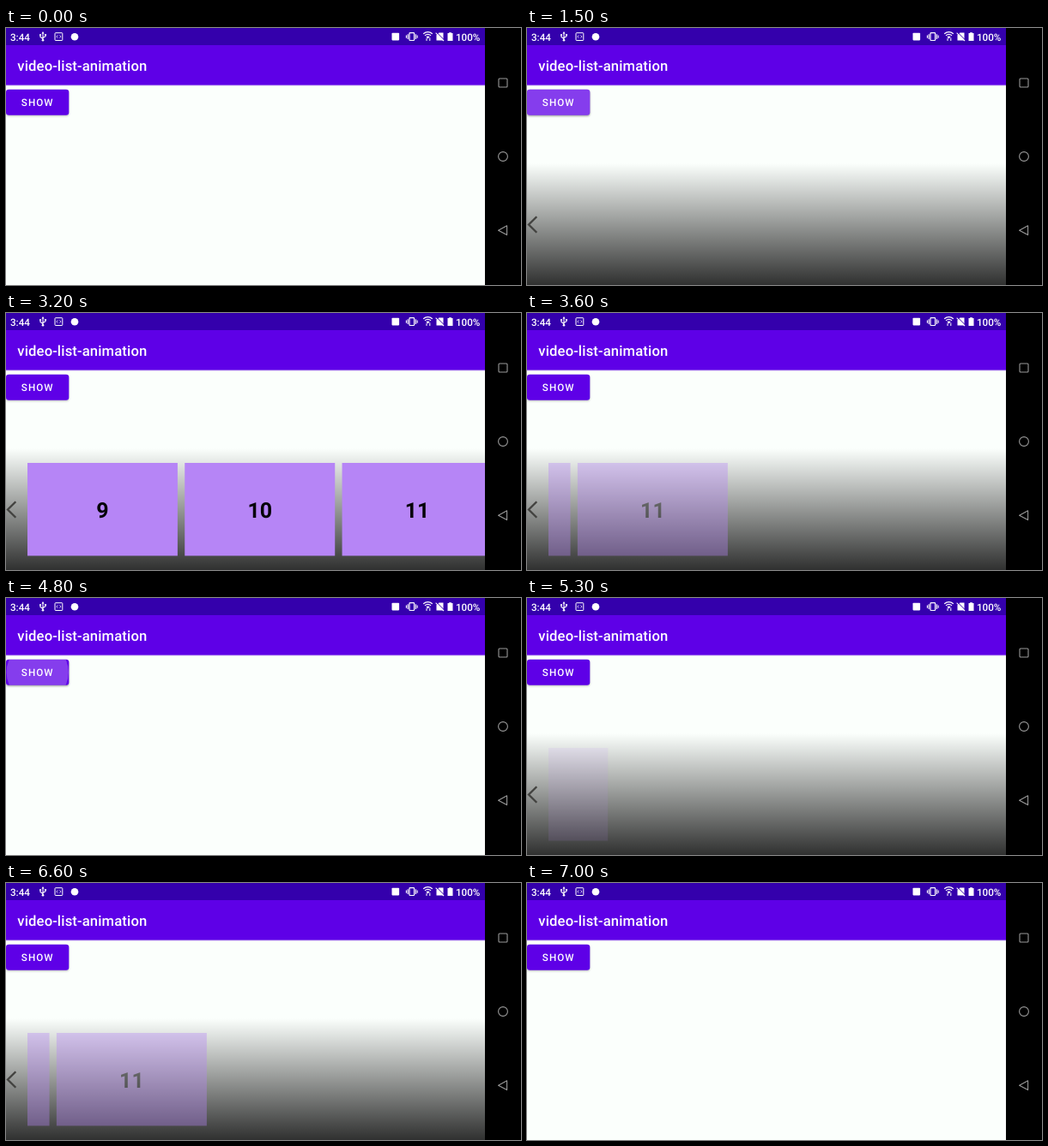
These frames come from a looping animation (600x300 px, 7100 ms). An HTML page:

```html
<!DOCTYPE html>
<html lang="en">
<head>
<meta charset="utf-8">
<title>List animation</title>
<style>
  html, body { margin: 0; width: 100%; height: 100%; overflow: hidden; background: #000; }
  svg { display: block; }
  text { font-family: Roboto, sans-serif; font-weight: 500; font-size: 11.67px; fill: #fff; text-rendering: geometricPrecision; }
  .title { font-size: 16.67px; letter-spacing: .0075em; }
  .label { letter-spacing: .0893em; }
  .number { font-size: 25px; font-weight: 700; fill: #050308; text-anchor: middle; }
  .line { fill: none; stroke: #fff; }
  .nav { fill: none; stroke: #999; stroke-width: 1.1; stroke-linejoin: round; }
</style>
</head>
<body>
<svg width="600" height="300" viewBox="0 0 600 300">
  <defs>
    <linearGradient id="shade" x1="0" y1="0" x2="0" y2="1">
      <stop offset="0" stop-opacity="0"/>
      <stop offset="1" stop-opacity=".81"/>
    </linearGradient>
    <clipPath id="listClip"><rect x="25" y="158" width="533" height="142"/></clipPath>
    <clipPath id="buttonClip"><rect y="71.7" width="73.3" height="30" rx="3.3"/></clipPath>
    <filter id="blur" x="-20%" y="-30%" width="140%" height="170%"><feGaussianBlur stdDeviation="1.3"/></filter>
  </defs>

  <rect width="558" height="300" fill="#fbfffc"/>
  <rect y="66" width="558" height="1.6" fill="#d9c9f4"/>
  <rect y="19" width="558" height="47.6" fill="#5e00e7"/>
  <rect width="558" height="20" fill="#3400ac"/>

  <!-- status bar -->
  <text x="5" y="14.6">3:44</text>
  <text x="524" y="14.6">100%</text>
  <g class="line">
    <path d="M43 6V14M40 8.5V10.5L43 12.5M46 8V9.8L43 11.5" stroke-width="1.1"/>
    <rect x="57" y="5.7" width="8.8" height="8.8" rx=".8"/>
    <path d="M60.3 8.5L58.8 10.1L60.3 11.7M62.5 8.5L64 10.1L62.5 11.7" stroke-width=".8"/>
    <rect x="470" y="5.7" width="5.6" height="8.8" rx=".8" stroke-width="1.2"/>
    <path d="M468.2 7.3V13M466.4 8.5V11.7M477.4 7.3V13M479.2 8.5V11.7" stroke-width="1.1"/>
    <path d="M486.2 6.8Q491.5 2.6 496.8 6.8M488 8.8Q491.5 6 495 8.8" stroke-width="1.3"/>
    <path d="M490 12V15M493.8 11.5V15" stroke-width="1"/>
  </g>
  <g fill="#fff">
    <path d="M43 4L44.5 6.4H41.5Z"/>
    <circle cx="43" cy="14.3" r="1.3"/>
    <circle cx="40" cy="8.2" r="1.1"/>
    <rect x="45" y="7" width="2" height="2"/>
    <circle cx="80" cy="10.2" r="4.3"/>
    <rect x="449.5" y="5.8" width="8.6" height="8.6" rx=".8"/>
    <path d="M489.4 10.2Q491.5 8.6 493.6 10.2L491.5 12.4Z"/>
    <path d="M504.5 5.5H509.5V14.5H501.5V8.2Z"/>
    <path d="M516 5.2H519V6.1H520.5V14.9H514.5V6.1H516Z"/>
  </g>
  <path class="line" d="M500.7 5.6L510 15" stroke-width="1.2"/>
  <path d="M501.7 5.1L510.6 14" stroke="#3400ac" stroke-width="1"/>

  <text class="title" x="13.3" y="49.8">video-list-animation</text>

  <!-- button -->
  <rect id="shadow" y="73" width="73.3" height="30" rx="3.3" filter="url(#blur)"/>
  <rect y="71.7" width="73.3" height="30" rx="3.3" fill="#5e00e7"/>
  <circle id="ripple" cx="36.7" cy="86.7" fill="#fff" clip-path="url(#buttonClip)"/>
  <text class="label" x="17.8" y="91">SHOW</text>

  <g id="panel">
    <rect y="158" width="558" height="142" fill="url(#shade)"/>
    <path d="M11.3 220.2L2 229.5L11.3 238.8" fill="none" stroke="#42423f" stroke-width="2.3"/>
    <g clip-path="url(#listClip)"><g id="list"></g></g>
  </g>

  <!-- navigation bar -->
  <rect x="558" width="42" height="300"/>
  <g class="nav">
    <rect x="574" y="59" width="10" height="10" rx="1"/>
    <circle cx="579" cy="150" r="5.4"/>
    <path d="M573.6 236.2L583.6 230.8V241.6Z"/>
  </g>
</svg>
<script>
const LOOP = 7100, LIST_WIDTH = 533, PITCH = 183.33;
const IN_TIME = 370, OUT_TIME = 700;
const cycles = [
  { press: 1400, enter: 1720, exit: 3195, hide: 3950 },
  { press: 4800, enter: 5220, exit: 6195, hide: 6950 }
];
const [shadow, ripple, panel, list] =
  ['shadow', 'ripple', 'panel', 'list'].map(id => document.getElementById(id));

list.innerHTML = [9, 10, 11].map((n, i) => {
  const x = 25 + i * PITCH;
  return `<rect x="${x}" y="175" width="175" height="108.4" fill="#b685f6"/>
    <text class="number" x="${x + 87.5}" y="239">${n}</text>`;
}).join('');

const clamp = v => Math.max(0, Math.min(1, v));
const ease = v => (1 - Math.cos(Math.PI * clamp(v))) / 2;

function draw(t) {
  const c = t < 4400 ? cycles[0] : cycles[1];
  const age = t - c.press;
  const pressed = age >= 0 ? 1 - clamp((age - 130) / 150) : 0;
  ripple.setAttribute('r', 36 + 12 * clamp(age / 80));
  ripple.setAttribute('opacity', 0.24 * pressed);
  shadow.setAttribute('opacity', 0.22 + 0.14 * pressed);

  panel.style.display = age >= 60 && t < c.hide ? '' : 'none';
  const shown = t < c.exit
    ? ease((t - c.enter) / IN_TIME)
    : 1 - ease((t - c.exit) / OUT_TIME);
  list.setAttribute('transform', `translate(${(shown - 1) * LIST_WIDTH} 0)`);
  list.setAttribute('opacity', shown);
}

const start = performance.now();
function tick() {
  draw((performance.now() - start) % LOOP);
  requestAnimationFrame(tick);
}
tick();
</script>
</body>
</html>
```
